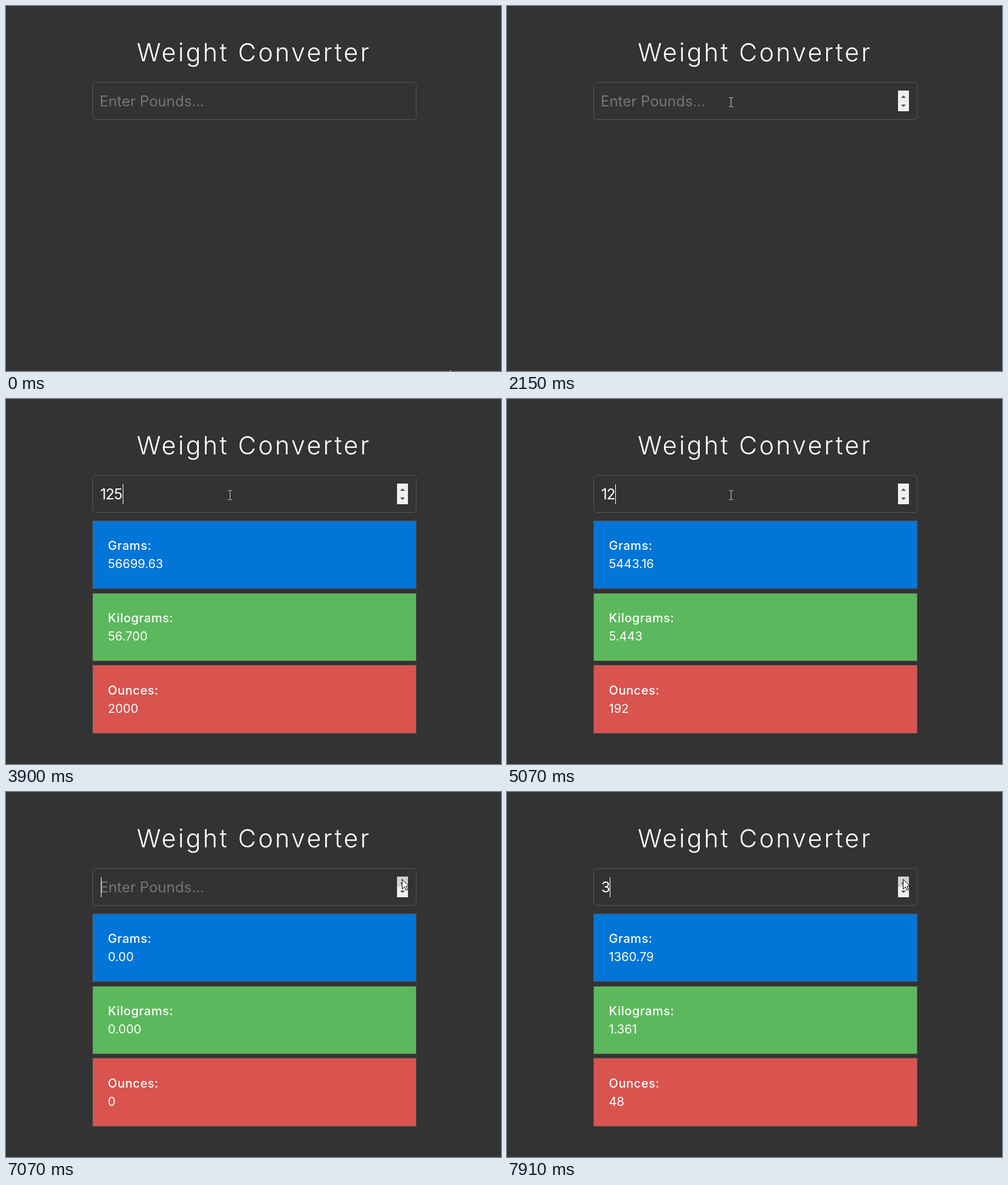
Write an HTML page that moves like this. It is 814 by 600 pixels and loops after 8000 ms.

```html
<!DOCTYPE html>
<html lang="en">
<head>
<meta charset="utf-8">
<title>Weight Converter</title>
<style>
  html, body { margin: 0; width: 100%; height: 100%; overflow: hidden; background: #333; }
  svg { display: block; width: 814px; height: 600px; font-family: Inter, sans-serif; fill: #fff; }
  .title { font-size: 41px; font-weight: 300; letter-spacing: 3.3px; }
  .entry { font-size: 24px; letter-spacing: -1px; }
  .hint { font-size: 24px; fill: #757575; }
  .label { font-size: 20px; font-weight: 500; letter-spacing: .55px; }
  .value { font-size: 20px; }
  .frame { stroke: #555; }
</style>
</head>
<body>
<svg viewBox="0 0 814 600">
  <text class="title" x="215" y="91">Weight Converter</text>
  <rect class="frame" x="142.5" y="125.5" width="532" height="61" rx="5" fill="#333"/>
  <text class="hint" id="hint" x="154" y="165">Enter Pounds...</text>
  <text class="entry" id="entry" x="155" y="165"></text>
  <rect id="caret" y="140" width="1" height="33"/>
  <g id="spin">
    <path fill="#f0f0f0" d="M643 139h18v34h-18z"/>
    <path id="hover" fill="#d2d2d2" d="M643 139h18v17h-18z"/>
    <path fill="#505050" d="M648 151l4-4 4 4zM648 162h8l-4 4z"/>
  </g>
  <g id="cards"></g>
  <path id="arrow" stroke="#000" d="M.5 .5V16.5L4.3 13 6.8 18.5 9.2 17.5 6.8 12H11.8Z"/>
  <path id="beam" fill="none" stroke="#ccc" d="M-3 -7.5H0M1 -7.5H4M.5 -7V7M-3 7.5H0M1 7.5H4"/>
</svg>
<script>
const LOOP = 8000;
const $ = id => document.getElementById(id);
const show = (id, on) => $(id).setAttribute('visibility', on ? 'visible' : 'hidden');

const cards = [
  ['Grams', '#0275d8', 200, 111, lb => (lb * 453.597).toFixed(2)],
  ['Kilograms', '#5cb85c', 319, 111, lb => (lb * .453597).toFixed(3)],
  ['Ounces', '#d9534f', 437, 112, lb => String(lb * 16)]
];
$('cards').innerHTML = cards.map(([name, color, y, h], i) => `
  <rect class="frame" x="142.5" y="${y + .5}" width="532" height="${h}" fill="${color}"/>
  <text class="label" x="167.5" y="${248 + i * 119}">${name}:</text>
  <text class="value" x="167.5" y="${278 + i * 119}"></text>`).join('');
const values = [...document.querySelectorAll('.value')];

// time, typed text
const typing = [
  [0, ''], [2540, '1'], [3350, '12'], [3900, '125'], [5070, '12'], [5210, '1'],
  [5440, ''], [7140, '1'], [7540, '2'], [7830, '3']
];
const caretX = { '': 156, 1: 163, 2: 169, 3: 169, 12: 178, 125: 192 };

// moments at which the caret turns on or off
const blinks = [1600, 2150, 2540, 4430, 4980, 5900, 6440, 6990, 7070];

// start, step length, step count, end x, end y
const moves = [
  [70, 79, 11, 353, 144], [900, 80, 3, 357, 135], [1140, 80, 3, 368, 158],
  [5900, 78, 1, 370, 159], [5978, 78, 10, 651, 138],
  [6760, 80, 2, 651, 141], [6990, 80, 1, 651, 143]
];

const ease = p => p * p * (3 - 2 * p);

function pointerAt(t) {
  let x = 729, y = 596;
  for (const [start, step, count, toX, toY] of moves) {
    if (t < start) break;
    const p = ease(Math.min(1, (Math.floor((t - start) / step) + 1) / count));
    x += (toX - x) * p;
    y += (toY - y) * p;
  }
  return [Math.round(x), Math.round(y)];
}

const inside = (x, y, l, t, r, b) => x >= l && x < r && y >= t && y < b;

function render(t) {
  const text = typing.filter(k => k[0] <= t).pop()[1];
  $('entry').textContent = text;
  show('hint', !text);
  $('caret').setAttribute('x', caretX[text]);
  show('caret', blinks.filter(b => b <= t).length % 2);

  show('cards', t >= 2540);
  values.forEach((el, i) => { el.textContent = cards[i][4](+text); });

  const [x, y] = pointerAt(t);
  const inField = inside(x, y, 142, 125, 675, 187);
  const onSpin = inside(x, y, 643, 139, 661, 173);
  $('spin').style.display = inField ? '' : 'none';
  $('hover').style.display = onSpin ? '' : 'none';
  show('beam', inField && !onSpin);
  show('arrow', !inField || onSpin);
  for (const id of ['beam', 'arrow']) $(id).setAttribute('transform', `translate(${x} ${y})`);
}

const begin = performance.now();
function tick() {
  render((performance.now() - begin) % LOOP);
  requestAnimationFrame(tick);
}
tick();
</script>
</body>
</html>
```
